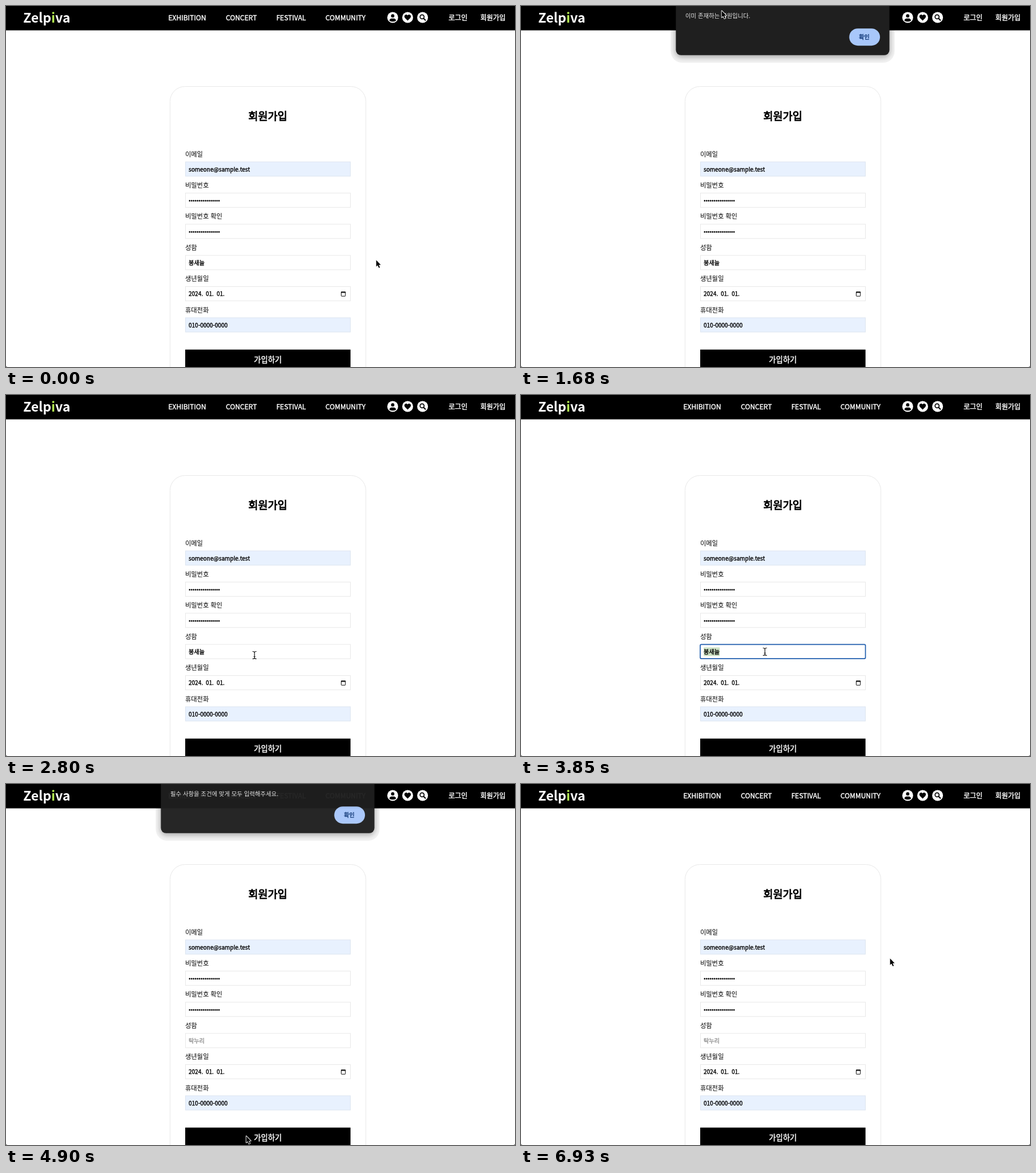
Write an HTML page that moves like this. It is 889x630 px and loops after 7000 ms.

```html
<!DOCTYPE html>
<html lang="ko">
<head>
<meta charset="utf-8">
<title>회원가입</title>
<style>
html, body { margin: 0; width: 100%; height: 100%; overflow: hidden; background: #fff; }
svg { position: absolute; left: 0; top: 0; width: 889px; height: 630px; }
text { font-family: "Noto Sans CJK KR", "Noto Sans CJK JP", "Noto Sans", sans-serif; fill: currentColor; white-space: pre; }
/* A thin outline gives the medium weight between regular and bold */
.med { stroke: currentColor; stroke-width: .035em; }
.mid { text-anchor: middle; }
.light { color: #fff; }
#alert { transform-origin: 457px 86px; }
</style>
</head>
<body>
<svg viewBox="0 0 889 630">
  <rect width="889" height="42.5"/>
  <text class="light" x="30" y="28.5" font-size="23" font-weight="700">Zelp<tspan fill="#b4ec51" style="fill:#b4ec51">i</tspan>va</text>
  <g id="nav" class="light"></g>
  <g fill="#fff">
    <circle cx="675.4" cy="20" r="9.5"/><circle cx="701.5" cy="20" r="9.5"/><circle cx="727.6" cy="20" r="9.5"/>
  </g>
  <circle cx="675.4" cy="17.2" r="2.9"/>
  <path d="M669.5 25.4q1-3.7 4.2-3.7h3.4q3.2 0 4.2 3.7q-5.9 3.8-11.8 0z"/>
  <path d="M701.5 25.6l-4.6-4.7c-3.2-3.7 1.7-8 4.6-4.5c2.9-3.5 7.8.8 4.6 4.5z"/>
  <circle cx="726.7" cy="18.9" r="3.5" fill="none" stroke="#000" stroke-width="1.7"/>
  <path d="M729.4 21.7l3 3" stroke="#000" stroke-width="2" stroke-linecap="round"/>

  <rect x="286.5" y="140.5" width="342" height="540" rx="26" fill="none" stroke="#e8e8e8"/>
  <text class="med mid" x="457.3" y="199" font-size="18.5" style="stroke-width:.05em">회원가입</text>
  <g id="form"></g>
  <g id="focus">
    <rect x="313" y="435.3" width="288.6" height="24.8" rx="2" fill="#fff" stroke="#205eae" stroke-width="1.7"/>
    <rect id="mark" x="319" y="440.5" width="28" height="15" fill="#cde2c5"/>
  </g>
  <text id="name" class="med" x="319" y="452" font-size="10.1"></text>
  <g fill="none" stroke="#111">
    <rect x="585.5" y="499" width="7.2" height="7.4" rx=".6"/>
    <path d="M585 499.6h8.2" stroke-width="2"/>
  </g>
  <rect x="313" y="599.6" width="288.7" height="40"/>
  <text class="med mid light" x="457.4" y="622" font-size="13.3">가입하기</text>
  <path d="M0 630v-3q0 3 3 3zM889 630v-3q0 3-3 3z" fill="#555"/>
</svg>

<svg id="alert" viewBox="0 0 889 630">
  <defs><filter id="soft" x="-20%" y="-20%" width="140%" height="140%"><feGaussianBlur stdDeviation="4"/></filter></defs>
  <rect x="261.5" y="-60" width="391" height="159" rx="20" opacity=".055"/>
  <rect x="269" y="-60" width="376" height="150" rx="12" opacity=".28" filter="url(#soft)"/>
  <rect x="270.5" y="-60" width="373" height="145.8" rx="9" fill="#1f1f1f"/>
  <text id="msg" x="287" y="21" font-size="10.35" color="#e6e6e6"></text>
  <rect id="ok" x="573.3" y="39.2" width="53.7" height="30" rx="15"/>
  <text class="med mid" x="599.5" y="58" font-size="10" color="#062e6f">확인</text>
</svg>

<svg viewBox="0 0 889 630">
  <g id="pointer">
    <path id="arrow" d="M.6.4V11.8l2.6-2.4 2 4.6 1.9-.8-2-4.5h3.5z" stroke="#fff" stroke-width="1.8" stroke-linejoin="round" paint-order="stroke"/>
    <path id="beam" d="M-3.5-6.5q3.5 0 3.5 2q0-2 3.5-2M0-4.5v9M-3.5 6.5q3.5 0 3.5-2q0 2 3.5 2M-1.5 2.5h3" fill="none" stroke="#111" stroke-width="1.2"/>
    <path id="hand" d="M-1.2 8V1q0-1.4 1.2-1.4T1.2 1v4.5l5 1.1q1.3.4 1.2 1.8l-.7 4.6-1.2 2.5h-5.5l-4-5.2q-.7-1.3.5-1.8q1 0 2.3 1.6z" fill="#fff" stroke="#000" stroke-linejoin="round"/>
  </g>
</svg>

<script>
const $ = id => document.getElementById(id);
const LOOP = 7000, STEP = 70;

const text = (x, y, size, s, attrs = 'class="med"') => `<text x="${x}" y="${y}" font-size="${size}" ${attrs}>${s}</text>`;
const value = (s, attrs) => text(319, 17, 10, s, attrs);

const links = { EXHIBITION: 283.5, CONCERT: 384, FESTIVAL: 472, COMMUNITY: 558, 로그인: 773, 회원가입: 828.5 };
$('nav').innerHTML = Object.entries(links).map(([s, x]) => text(x, 25, 12, s)).join('');

const dots = Array.from({ length: 16 }, (_, i) => `<circle cx="${320.8 + i * 3.41}" cy="13.7" r="1.35"/>`).join('');
const fields = [
  { label: '이메일', body: value('someone@sample.test'), filled: true },
  { label: '비밀번호', body: dots },
  { label: '비밀번호 확인', body: dots },
  { label: '성함', body: '' },
  { label: '생년월일', body: value('2024. 01. 01.', 'class="med" word-spacing="2.2"') },
  { label: '휴대전화', body: value('010-0000-0000'), filled: true }
];
const fieldTop = i => 271.8 + i * 54.4;
$('form').innerHTML = fields.map(({ label, body, filled }, i) =>
  `<g transform="translate(0 ${fieldTop(i)})">${text(313, -9.3, 11.2, label, '')}
  <rect x="313.5" y=".2" width="288" height="25" fill="${filled ? '#e8f1fe' : '#fff'}" stroke="${filled ? '#dde5f0' : '#e8e8e8'}"/>${body}</g>`).join('');

// Pointer stops: departure, arrival, place, sideways bow of the way there
const stops = [
  [-STEP, 0, 646, 443, 0],
  [0, 770, 441, 608, -.25],
  [1260, 1680, 350, 8, -.16],
  [1680, 2170, 587, 50, -.12],
  [2450, 2800, 434, 454, -.1],
  [2800, 2940, 421, 467, 0],
  [3010, 3220, 426, 448, 0],
  [3990, 4340, 419, 614, 0],
  [5180, 5950, 627, 70, .75],
  [5950, 6230, 622, 62, 0],
  [6510, 6930, 644, 304, 0]
];

function pointerAt(t) {
  const i = stops.findLastIndex(s => s[0] <= t);
  const [from, to, x, y, bow] = stops[i], [, , x0, y0] = stops[Math.max(0, i - 1)];
  const k = Math.min(1, (t - from) / (to - from)), u = k * k * (3 - 2 * k);
  const cx = (x0 + x) / 2 - bow * (y - y0), cy = (y0 + y) / 2 + bow * (x - x0);
  const curve = (a, c, b) => (1 - u) ** 2 * a + 2 * u * (1 - u) * c + u * u * b;
  return [curve(x0, cx, x), curve(y0, cy, y)];
}

// Opacity and closing tilt of a dialog, counted in steps since it opened or closed
function alertAt(t) {
  const [open, close] = t < 4000 ? [840, 2450] : [4830, 6510];
  const shown = (t - open) / STEP + 1, gone = (t - close) / STEP + 1;
  if (shown < 1 || gone > 2) return [0, 0];
  return gone < 1 ? [1 - Math.max(0, 1 - shown / 3) ** 3, 0] : [1 - .24 * gone ** 1.6, gone];
}

function pointerKind(x, y, modal) {
  if (modal || x < 313 || x > 602) return 'arrow';
  if (y >= 600) return 'hand';
  return fields.some((f, i) => f.label !== '생년월일' && y >= fieldTop(i) && y <= fieldTop(i) + 25.5) ? 'beam' : 'arrow';
}

const show = (id, on) => { $(id).style.display = on ? '' : 'none'; };

function draw(t) {
  const [x, y] = pointerAt(t), [alpha, tilt] = alertAt(t), empty = t >= 3990;
  const kind = pointerKind(x, y, alpha > 0);
  $('pointer').setAttribute('transform', `translate(${x} ${y})`);
  for (const id of ['arrow', 'beam', 'hand']) show(id, id === kind);

  show('focus', t >= 3780 && t < 4480);
  show('mark', t >= 3850 && !empty);
  $('name').textContent = empty ? '탁누리' : '봉새늘';
  $('name').style.color = empty ? '#8f8f8f' : '#000';

  show('alert', alpha > 0);
  $('alert').style.opacity = alpha;
  $('alert').style.transform = tilt
    ? `translateY(${-4.6 * tilt}px) perspective(1200px) scale(${1 - .003 * tilt}) rotateX(${4 * tilt}deg)` : 'none';
  $('msg').textContent = empty ? '필수 사항을 조건에 맞게 모두 입력해주세요.' : '이미 존재하는 회원입니다.';
  const hover = x > 573 && x < 627 && y > 39 && y < 69;
  $('ok').setAttribute('fill', hover ? '#9ab8ea' : '#a8c7fa');
}

const start = performance.now();
function tick() {
  const t = (performance.now() - start) % LOOP;
  draw(Math.floor(t / STEP) * STEP);
  requestAnimationFrame(tick);
}
tick();
</script>
</body>
</html>
```
